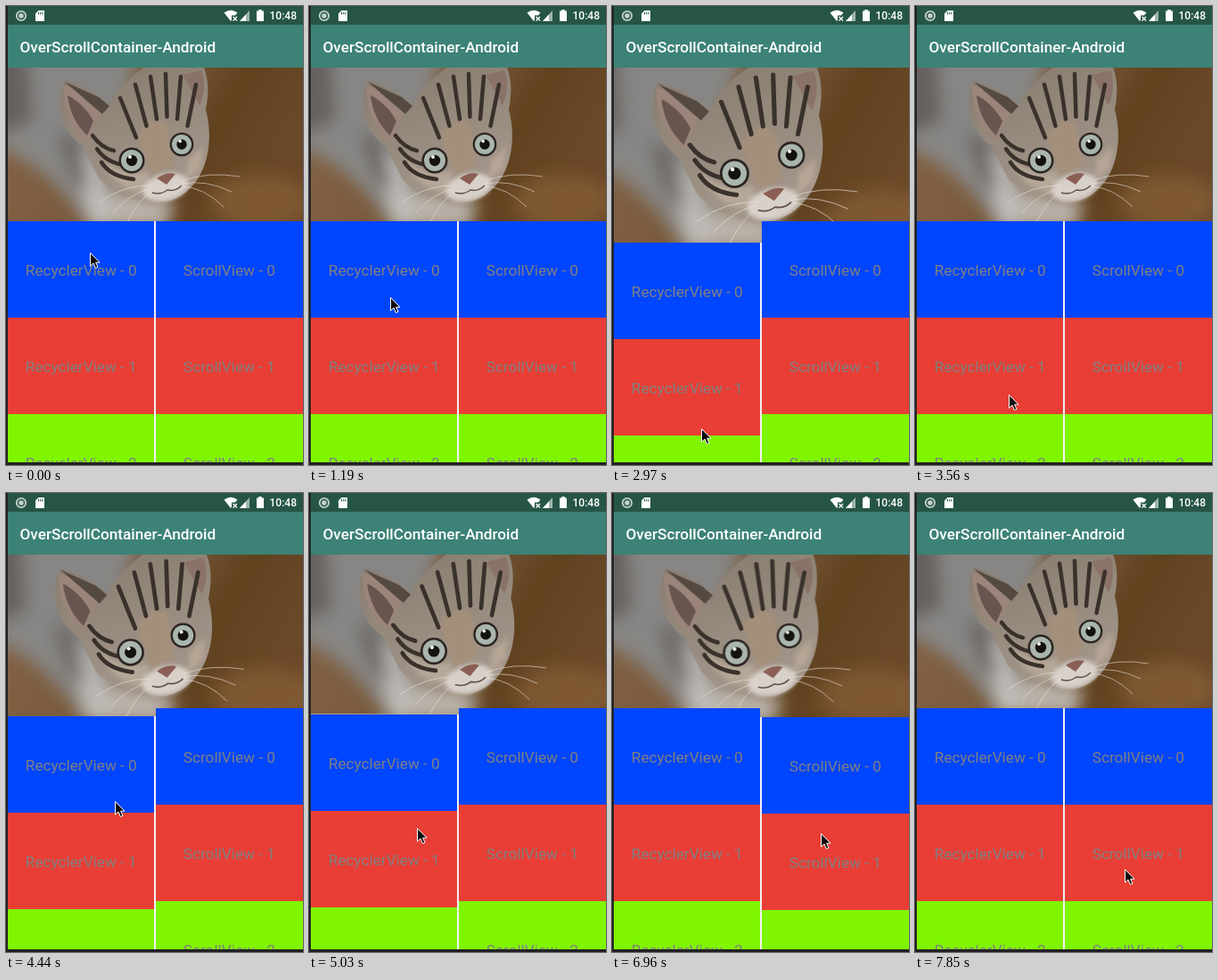
These frames come from a looping animation (333x514 px, 8000 ms). An HTML page:

```html
<!DOCTYPE html>
<html lang="en">
<head>
<meta charset="utf-8">
<title>Overscroll demo</title>
<style>
  html, body { margin: 0; width: 100%; height: 100%; overflow: hidden; background: #202022; }
  svg { display: block; width: 333px; height: 514px; }
  text { font-family: Roboto, sans-serif; font-size: 17.2px; }
  .row { fill: #808080; text-anchor: middle; }
  .bar { fill: #fff; font-weight: 500; }
  #stripes { fill: none; stroke: #39312b; stroke-width: 4.5; stroke-linecap: round; }
  #whiskers { fill: none; stroke: #e9e1d6; stroke-width: .8; opacity: .75; }
</style>
</head>
<body>
<svg viewBox="0 0 333 514">
  <defs>
    <linearGradient id="wall" x2="1" y2=".3">
      <stop offset="0" stop-color="#85664a"/>
      <stop offset=".5" stop-color="#7a5a3c"/>
      <stop offset=".75" stop-color="#60421f"/>
      <stop offset="1" stop-color="#6b4828"/>
    </linearGradient>
    <linearGradient id="fur" x2=".4" y2="1">
      <stop offset="0" stop-color="#85796c"/>
      <stop offset="1" stop-color="#a3968a"/>
    </linearGradient>
    <filter id="soft" x="-30%" y="-30%" width="160%" height="160%"><feGaussianBlur stdDeviation="9"/></filter>
    <filter id="hazy" x="-30%" y="-30%" width="160%" height="160%"><feGaussianBlur stdDeviation="2.5"/></filter>
    <filter id="fine"><feGaussianBlur stdDeviation=".7"/></filter>
    <clipPath id="crop"><rect width="333" height="172"/></clipPath>
    <g id="eye">
      <circle r="14.5" fill="#2b2420"/>
      <circle r="12" fill="#a9b5ad"/>
      <circle r="6.2" fill="#14120f"/>
      <circle cx="-2" cy="-4" r="2" fill="#eef2f2"/>
    </g>
  </defs>

  <rect y="69" width="333" height="442" fill="#f4f0f4"/>

  <g id="photo"><g clip-path="url(#crop)">
    <rect width="333" height="172" fill="url(#wall)"/>
    <g filter="url(#soft)">
      <ellipse cx="285" cy="150" rx="55" ry="30" fill="#88613a" opacity=".7"/>
      <path d="M-20 -20H150L120 90V180H95C70 150 50 110 -20 85Z" fill="#878684"/>
      <path d="M-20 -20H25L30 60L-20 80Z" fill="#66615f"/>
      <path d="M75 85L105 110L125 180H95Z" fill="#c0bdb9"/>
      <path d="M58 70L80 85L95 140L75 120Z" fill="#5d5753"/>
      <path d="M120 135L190 150L180 180H115Z" fill="#b9b2aa"/>
    </g>
    <g filter="url(#fine)">
      <path d="M86 88C66 74 52 46 66 15C80 17 104 30 116 42C124 24 142 8 160 -4H214L222 0C228 14 227 32 224 47C236 92 220 140 180 150C152 152 118 140 104 124Z" fill="url(#fur)"/>
      <path d="M64 20C76 22 96 36 106 50L92 82C76 74 65 54 64 20Z" fill="#9b857a"/>
      <path d="M69 31C80 36 92 48 98 60L91 76C79 65 71 49 69 31Z" fill="#675650"/>
      <path d="M198 8L219 3C224 16 222 31 217 42Z" fill="#8a7268"/>
      <path d="M66 16L104 33L116 43L108 52Z" fill="#554a42"/>
    </g>
    <g filter="url(#hazy)">
      <path d="M148 76C158 60 170 55 181 64L188 108L164 122Z" fill="#a4907a"/>
      <path d="M108 102Q130 124 160 116L158 140Q120 138 108 102Z" fill="#b5a898"/>
      <path d="M204 104L221 88L218 112L202 126Z" fill="#b5a695"/>
      <ellipse cx="179" cy="134" rx="26" ry="15" fill="#d8d1ca" transform="rotate(-14 179 134)"/>
    </g>
    <g id="stripes" filter="url(#fine)"></g>
    <use href="#eye" x="141" y="104"/>
    <use href="#eye" transform="translate(197 86) scale(.92)"/>
    <g filter="url(#fine)">
      <path d="M169 124Q180 116 190 119L180 131Z" fill="#8b5f55"/>
      <path d="M164 140Q173 143 181 137Q190 139 197 132" fill="none" stroke="#62514a" stroke-width="1.5"/>
    </g>
    <g id="whiskers"></g>
  </g></g>

  <g id="left"></g>
  <g id="right"></g>

  <rect y="511" width="333" height="3" fill="#202022"/>
  <rect width="333" height="21" fill="#265548"/>
  <rect y="21" width="333" height="48" fill="#3c8276"/>
  <rect width="2" height="514" fill="#202022"/>
  <text class="bar" x="15.5" y="52">OverScrollContainer-Android</text>

  <circle cx="17" cy="11" r="5.2" fill="none" stroke="#c3d0cb" stroke-width="1.8"/>
  <circle cx="17" cy="11" r="2.8" fill="#c3d0cb"/>
  <path d="M36.5 5H43V17H33V8.5Z" fill="#fff"/>
  <path d="M36 8.2H42" stroke="#265548" stroke-width="2.4" stroke-dasharray="1 1.2"/>
  <path d="M244.5 7.5Q252 2 259.5 7.5L257 10.5H253V15.5L252 17Z" fill="#fff"/>
  <path d="M254.5 12L259 16.5M259 12L254.5 16.5" stroke="#fff" stroke-width="1.3"/>
  <path d="M262 17L273 5V17Z" fill="#9db5ad"/>
  <path d="M262 17L269 9.4V17Z" fill="#fff"/>
  <path d="M281 5.5H283.3V4H286.7V5.5H289V17H281Z" fill="#fff"/>
  <text class="bar" x="295.5" y="15.2" style="font-size:12px">10:48</text>

  <path id="pointer" d="M.5 .5V15.2L4 12L6.4 17.5L9 16.4L6.6 11.2H11Z" fill="#0a0a0a" stroke="#fff"/>
</svg>
<script>
const LOOP = 8000, STEP = 146.7, TOP = 69, PHOTO = 172, ROW = 108, MIDDLE = 167;
const COLORS = ['#0045ff', '#e83e35', '#80f500'];
const byId = id => document.getElementById(id);
const [photo, left, right, pointer] = ['photo', 'left', 'right', 'pointer'].map(byId);
const repeat = (count, make) => Array.from({ length: count }, (_, i) => make(i)).join('');

function fillColumn(column, label, x, width, textX) {
  column.innerHTML = repeat(COLORS.length, i => {
    const y = TOP + PHOTO + i * ROW;
    return `<rect x="${x}" y="${y}" width="${width}" height="${ROW + .5}" fill="${COLORS[i]}"/>` +
      `<text class="row" x="${textX}" y="${y + 61}">${label} - ${i}</text>`;
  });
}
fillColumn(left, 'RecyclerView', 2, 164, 84.3);
fillColumn(right, 'ScrollView', 168, 165, 250.3);

// Forehead stripes fan out upwards, cheek stripes follow the jaw.
byId('stripes').innerHTML = repeat(6, i => {
  const bend = (3 - i) ** 2;
  return `<path d="M${128 + 17 * i} ${7 + 3 * bend}L${146 + 11.5 * i} ${55 + 2.6 * bend}"/>`;
}) + repeat(3, i =>
  `<path d="M${97 + 5 * i} ${76 + 15 * i}q10 ${14 + i} ${24 + 6 * i} ${17 + i}"/>`);

byId('whiskers').innerHTML = repeat(3, i =>
  `<path d="M164 ${132 + 3 * i}Q${132 + 8 * i} ${131 + 9 * i} ${104 + 16 * i} ${151 + 11 * i}` +
  `M197 ${127 + 3 * i}Q${226 - 2 * i} ${116 + 9 * i} ${262 - 9 * i} ${122 + 17 * i}"/>`);

// Each move: start time, steps, then the pose it ends in.
const REST = { x: 94, y: 276, pull: 0 };
const MOVES = [
  [1050, 3, 86, 425, 0],
  [1790, 4, 108, 310, 0],
  [2380, 5, 100, 473, 24],
  [3120, 2, 100, 473, 0],
  [3560, 5, 124, 284, 0],
  [4293, 3, 121, 375, 13.5],
  [4890, 2, 121, 375, 0],
  [5180, 1, 240, 440, 0],
  [5470, 1, 254, 492, 0],
  [5620, 2, 218, 396, 0],
  [5920, 1, 243, 344, 0],
  [6220, 2, 240, 305, 0],
  [6665, 3, 234, 381, 10],
  [7105, 1, 234, 421, 16],
  [7400, 2, 234, 421, 0],
  [7850, 1, 235, 421, 0]
];

function poseAt(t) {
  let pose = REST;
  for (const [start, steps, x, y, pull] of MOVES) {
    if (t < start) break;
    const done = Math.min(steps, Math.floor((t - start) / STEP) + 1) / steps;
    const mix = (a, b) => a + (b - a) * done;
    pose = { x: mix(pose.x, x), y: mix(pose.y, y), pull: mix(pose.pull, pull) };
  }
  return pose;
}

const shift = (node, x, y) => node.setAttribute('transform', `translate(${x} ${y})`);

function draw(t) {
  const { x, y, pull } = poseAt(t);
  const zoom = 1 + pull / PHOTO, onLeft = x < MIDDLE;
  photo.setAttribute('transform',
    `translate(${MIDDLE} ${TOP}) scale(${zoom}) translate(${-MIDDLE} 0)`);
  shift(left, 0, onLeft ? Math.round(pull) : 0);
  shift(right, 0, onLeft ? 0 : Math.round(pull));
  shift(pointer, Math.round(x), Math.round(y));
}

const start = performance.now();
function tick() {
  draw((performance.now() - start) % LOOP);
  requestAnimationFrame(tick);
}
tick();
</script>
</body>
</html>
```
